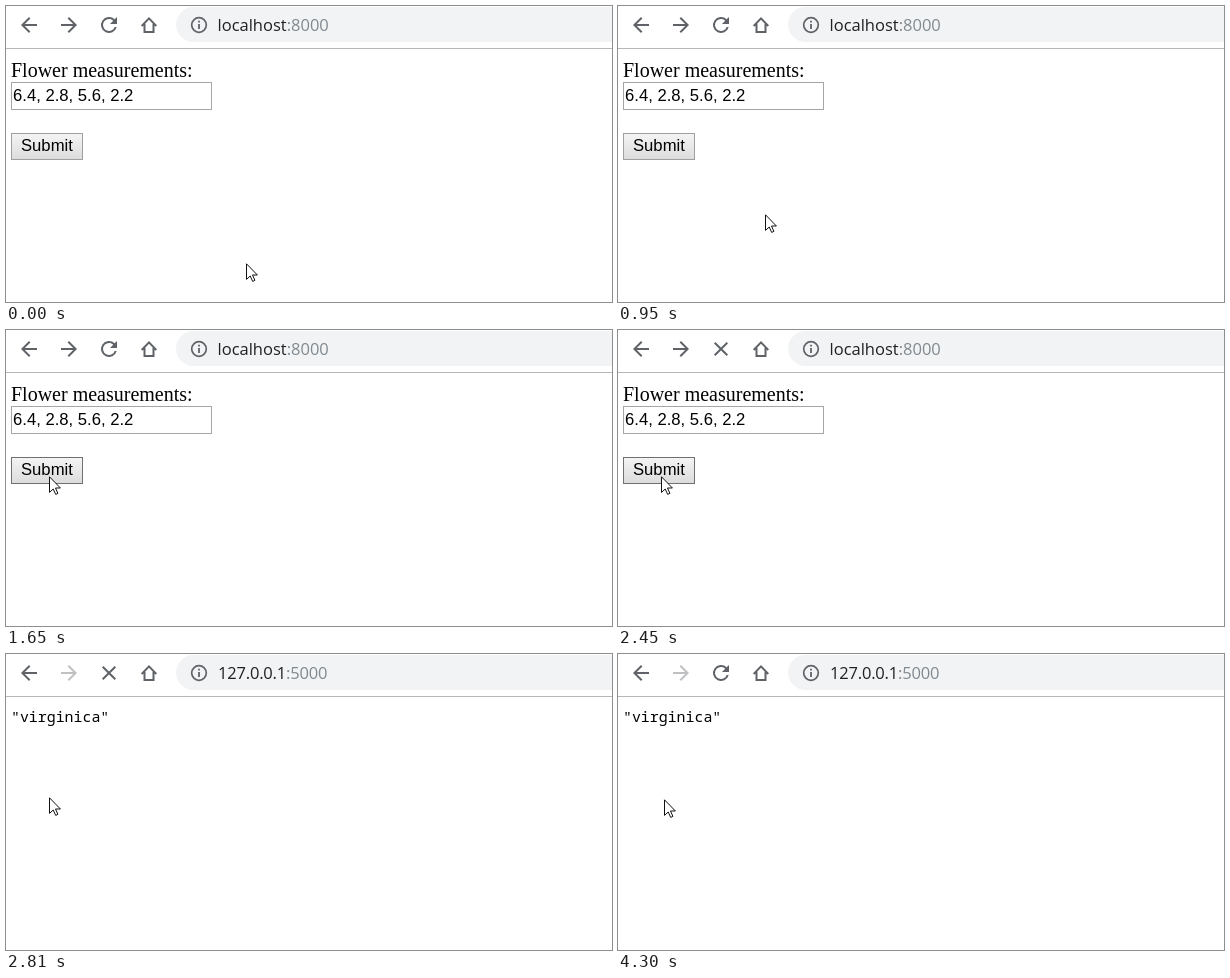
An HTML page for the animation above (4920 ms loop, 606 px wide and 296 px high).

```html
<!DOCTYPE html>
<html lang="en">
<head>
<meta charset="utf-8">
<title>Flower form</title>
<style>
  html, body { margin: 0; width: 100%; height: 100%; overflow: hidden; background: #fff; }
  svg { display: block; }
  .icon { fill: #5f6368; }
  .line { fill: none; stroke: #5f6368; stroke-width: 2; }
  .url { font: 16.5px "Open Sans", "Noto Sans", sans-serif; fill: #202124; }
  .port { fill: #80898f; }
  .label { font: 20px "Liberation Serif", "Times New Roman", serif; }
  .field { font: 16.667px "Liberation Sans", Arial, sans-serif; }
  .mono { font: 14.9px "Noto Sans Mono", "DejaVu Sans Mono", monospace; }
</style>
</head>
<body>
<svg width="606" height="296" viewBox="0 0 606 296">
  <defs>
    <linearGradient id="up" x2="0" y2="1">
      <stop stop-color="#f4f4f4"/><stop offset="1" stop-color="#dcdcdc"/>
    </linearGradient>
    <linearGradient id="down" x2="0" y2="1">
      <stop stop-color="#dcdcdc"/><stop offset="1" stop-color="#f2f2f2"/>
    </linearGradient>
    <path id="arrow" d="M20 11H7.83l5.59-5.59L12 4l-8 8 8 8 1.41-1.41L7.83 13H20z"/>
  </defs>

  <!-- toolbar -->
  <rect x="170" y="1" width="480" height="35" rx="17.5" fill="#f1f3f4"/>
  <rect y="42" width="606" height="1" fill="#b6b6b6"/>
  <use href="#arrow" class="icon" x="11" y="7"/>
  <use href="#arrow" class="icon" id="forward" transform="translate(75 7) scale(-1 1)"/>
  <path id="reload" class="icon" transform="translate(91 7)" d="M17.65 6.35A8 8 0 1 0 19.73 14h-2.08A6 6 0 1 1 12 6c1.66 0 3.14.69 4.22 1.78L13 11h7V4z"/>
  <path id="stop" class="line" d="M96.7 12.7l12.6 12.6M109.3 12.7L96.7 25.3"/>
  <path class="line" d="M135.7 20L143 12.4l7.3 7.6M138.5 18v8h9v-8"/>
  <circle class="line" cx="193" cy="19" r="7.3" style="stroke-width:1.7"/>
  <path class="icon" d="M192.1 14.8h1.8v1.8h-1.8zM192.1 18.1h1.8v5h-1.8z"/>

  <g id="form">
    <text class="url" x="211.5" y="25">localhost<tspan class="port">:8000</tspan></text>
    <text class="label" x="5" y="71">Flower measurements:</text>
    <rect x="5.5" y="76.5" width="200" height="27" fill="#fff" stroke="#a6a6a6"/>
    <text class="field" x="7" y="95">6.4, 2.8, 5.6, 2.2</text>
    <rect id="button" x="5.5" y="127.5" width="71" height="26"/>
    <text class="field" x="15" y="145">Submit</text>
  </g>

  <g id="result">
    <text class="url" x="212" y="25" letter-spacing="-.2">127.0.0.1<tspan class="port">:5000</tspan></text>
    <text class="mono" x="5" y="68">"virginica"</text>
  </g>

  <path id="cursor" fill="#fff" stroke="#111" d="M.5 .8V16.4L4.2 13l2.5 5.4 2.2-1L6.5 12h4.9z"/>
</svg>
<script>
  const LOOP = 4920;
  const PRESS = 2330, RELEASE = 2420, LOADING = 2450, ARRIVE = 2710, LOADED = 2830;
  const START = [240, 257];
  // start ms, end ms, steps, target x, target y
  const moves = [
    [360, 360, 1, 240, 259],
    [750, 1250, 21, 65, 154],
    [1280, 1650, 13, 43, 146],
    [2480, 2630, 3, 43, 143],
    [3320, 3320, 1, 46, 143],
    [4300, 4300, 1, 46, 145]
  ];

  const el = id => document.getElementById(id);
  const show = (id, on) => el(id).setAttribute("visibility", on ? "visible" : "hidden");

  function ease(p, power) {
    const q = p ** power;
    return q * q * (3 - 2 * q);
  }

  function cursorAt(t) {
    let [x, y] = START;
    for (const [from, to, steps, tx, ty] of moves) {
      if (t < from) break;
      const done = t >= to ? steps : 1 + Math.floor((t - from) / (to - from) * (steps - 1));
      const p = done / steps;
      x += (tx - x) * ease(p, 0.77);
      y += (ty - y) * ease(p, 0.84);
    }
    return [Math.round(x), Math.round(y)];
  }

  function draw(t) {
    const [x, y] = cursorAt(t);
    const hover = x < 77 && y < 154;
    const pressed = t >= PRESS && t < RELEASE;
    const loading = t >= LOADING && t < LOADED;
    const arrived = t >= ARRIVE;

    el("cursor").setAttribute("transform", `translate(${x} ${y})`);
    el("button").setAttribute("fill", `url(#${pressed ? "down" : "up"})`);
    el("button").setAttribute("stroke", hover ? "#707070" : "#a0a0a0");
    el("forward").setAttribute("opacity", arrived ? 0.4 : 1);
    show("reload", !loading);
    show("stop", loading);
    show("form", !arrived);
    show("result", arrived);
  }

  function tick() {
    draw(performance.now() % LOOP);
    requestAnimationFrame(tick);
  }
  tick();
</script>
</body>
</html>
```
